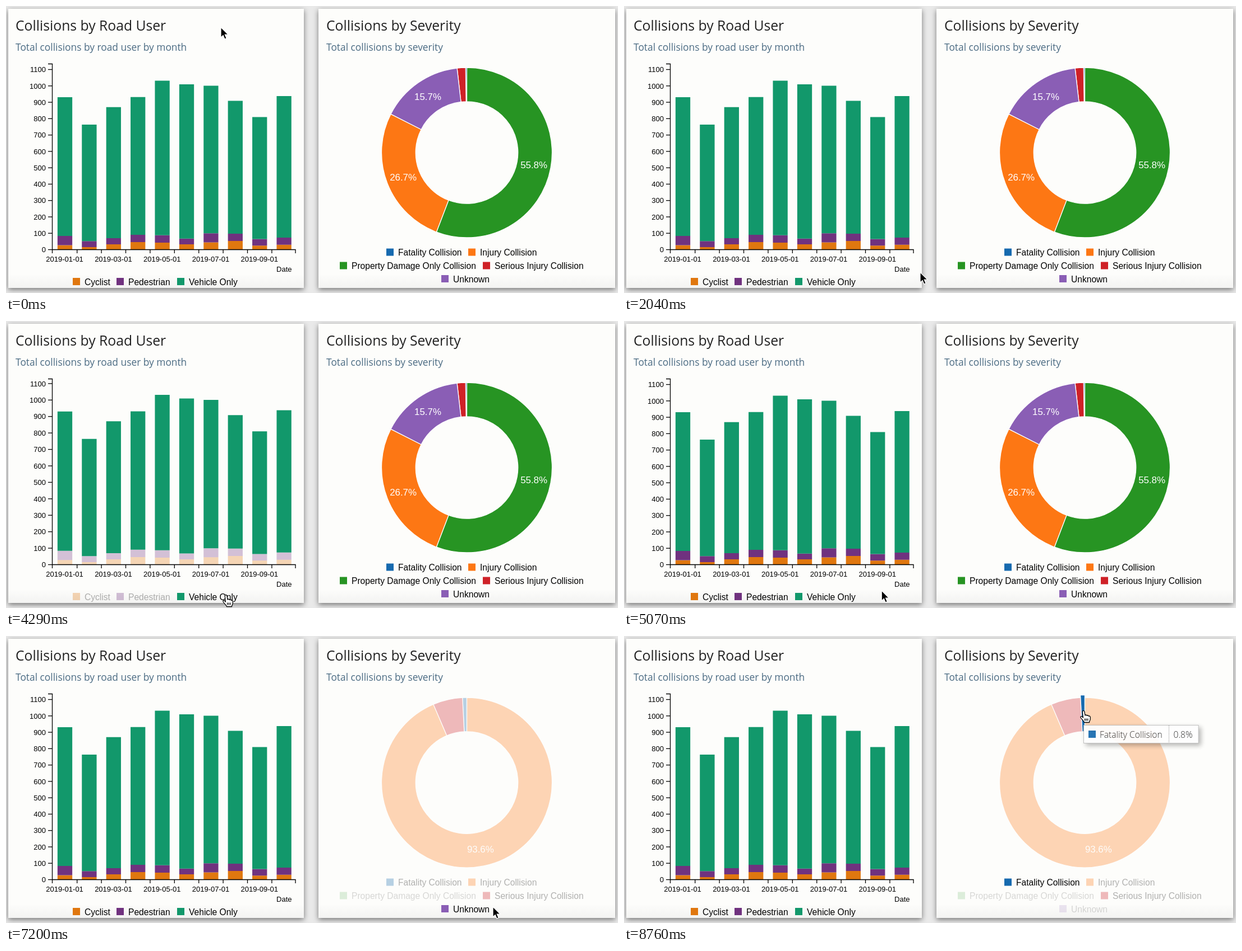
Animation, 1091 px wide and 513 px high, one loop 8.79 s. Source, as an HTML page:

```html
<!DOCTYPE html>
<html lang="en">
<head>
<meta charset="utf-8">
<title>Collisions dashboard</title>
<style>
  html, body { margin: 0; width: 100%; height: 100%; overflow: hidden; background: #e9e9e9; }
  svg { display: block; font-family: "Liberation Sans", Arial, sans-serif; }
  .card { fill: url(#paper); filter: drop-shadow(0 3px 5px rgba(0,0,0,.5)); }
  .title { font: 24.7px "Open Sans", sans-serif; fill: #222; }
  .sub { font: 17.35px "Open Sans", sans-serif; fill: #4b6b83; }
  .axis { fill: none; stroke: #000; stroke-width: 1.3; }
  .tick { font-size: 13px; }
  .key { font-size: 15.6px; }
  .share { font-size: 16.9px; fill: #fff; text-anchor: middle; }
  .tip { font: 300 15.6px "Open Sans", sans-serif; fill: #222; }
</style>
</head>
<body>
<svg id="stage" width="1091" height="513" viewBox="0 0 1091 513">
  <defs>
    <linearGradient id="paper" x1="0" y1="0" x2="0" y2="1">
      <stop offset=".95" stop-color="#fdfdfb"/>
      <stop offset="1" stop-color="#f3f3f2"/>
    </linearGradient>
    <clipPath id="plot"><rect x="60" y="103" width="460" height="333"/></clipPath>
  </defs>
  <rect width="1091" height="513" fill="#e9e9e9"/>
  <rect class="card" x="4" y="5" width="527" height="499"/>
  <rect class="card" x="557" y="5" width="529" height="499"/>
  <text class="title" x="17" y="44">Collisions by Road User</text>
  <text class="sub" x="17" y="79.5">Total collisions by road user by month</text>
  <text class="title" x="571" y="44">Collisions by Severity</text>
  <text class="sub" x="571" y="79.5">Total collisions by severity</text>
  <text class="tick" x="509.5" y="474.5" text-anchor="end">Date</text>
</svg>
<script>
const LOOP = 8790, BASE = 435, TOP = 103.5, RIGHT = 516;
const CX = 821.5, CY = 262, OUTER = 152, INNER = 91.2;

// Clicks that toggle a legend entry
const HIDE_VEHICLE = 2500, SHOW_VEHICLE = 3959, HIDE_DAMAGE = 6350, HIDE_UNKNOWN = 6800;

const cyclist = [26, 14, 31, 44, 41, 31, 43, 51, 23, 28];
const onFoot = [82, 50, 68, 89, 86, 66, 98, 96, 63, 72];
const total = [929, 762, 869, 930, 1030, 1008, 999, 907, 808, 936];
const levels = [cyclist.map(() => 0), cyclist, onFoot, total];

const users = [
  { name: "Cyclist", color: "#e0770f", x: 119, y: 486 },
  { name: "Pedestrian", color: "#70327f", x: 197, y: 486 },
  { name: "Vehicle Only", color: "#12986b", x: 305, y: 486 }
];
const kinds = [
  { name: "Fatality Collision", color: "#166aaf", x: 678, y: 433.5, size: .23 },
  { name: "Injury Collision", color: "#fd7714", x: 824, y: 433.5, size: 26.7 },
  { name: "Property Damage Only Collision", color: "#279423", x: 595, y: 457.5, size: 55.8 },
  { name: "Serious Injury Collision", color: "#cf2127", x: 850, y: 457.5, size: 1.6 },
  { name: "Unknown", color: "#8a5eb5", x: 776, y: 481, size: 15.7 }
];
const clockwise = [2, 1, 4, 3, 0];

// Focused entry over time, -1 for none
const userFocus = [[0, -1], [2300, 2], [2760, -1], [3720, 2], [4720, -1]];
const kindFocus = [[0, -1], [5750, 2], [6610, 4], [7240, -1], [7660, 1], [7825, -1], [8400, 0]];
const handTimes = [[2300, 2760], [3720, 4720], [5750, 7130], [7660, 7825], [8400, LOOP]];
const route = [
  [0, 383, 38], [900, 383, 38], [2040, 528, 476], [2350, 372, 493], [2600, 372, 493],
  [2910, 515, 486], [3300, 515, 486], [3800, 392, 490], [4600, 392, 490],
  [5900, 617, 463], [6400, 617, 463], [6680, 825, 488], [6850, 825, 488],
  [7200, 868, 484], [7300, 868, 484], [8550, 819, 134], [LOOP, 819, 134]
];

const stage = document.getElementById("stage");
const lerp = (a, b, u) => a + (b - a) * u;
const clamp = u => Math.max(0, Math.min(1, u));
const smooth = u => u * u * (3 - 2 * u);
const cubic = u => u < .5 ? 4 * u ** 3 : 1 - 4 * (1 - u) ** 3;
const redraw = (t, start) => cubic(clamp((t - start) / 350));

function set(el, attrs) {
  for (const k in attrs) el.setAttribute(k, attrs[k]);
  return el;
}
function add(tag, attrs, parent = stage, text) {
  const el = set(document.createElementNS("http://www.w3.org/2000/svg", tag), attrs);
  if (text !== undefined) el.textContent = text;
  return parent.appendChild(el);
}

// Bar chart
const plot = add("g", { "clip-path": "url(#plot)" });
const layers = users.map(u => add("path", { fill: u.color }, plot));
const frame = add("path", { class: "axis" });
function makeTicks(step, count) {
  return Array.from({ length: count }, (_, i) => {
    const g = add("g", {});
    add("path", { class: "axis", d: "M-7.5 0H0" }, g);
    add("text", { class: "tick", x: -11.5, y: 4.7, "text-anchor": "end" }, g, i * step);
    return { g, value: i * step };
  });
}
const coarse = makeTicks(100, 12), fine = makeTicks(10, 11);
const months = [1, 3, 5, 7, 9].map(m => ({
  slot: m - 1,
  el: add("text", { class: "tick", y: 456.5, "text-anchor": "middle" }, stage, `2019-0${m}-01`)
}));

// Donut chart
const slices = kinds.map(k => {
  const g = add("g", {});
  return {
    g,
    arc: add("path", { fill: k.color, stroke: "#fff", "stroke-width": 1.3 }, g),
    label: add("text", { class: "share" }, g)
  };
});

const makeLegend = list => list.map(k => {
  const g = add("g", {});
  add("rect", { x: k.x, y: k.y, width: 13, height: 13, fill: k.color }, g);
  add("text", { class: "key", x: k.x + 21, y: k.y + 12.7 }, g, k.name);
  return g;
});
const userKeys = makeLegend(users), kindKeys = makeLegend(kinds);

// Tooltip
const tip = add("g", { opacity: .92 });
const tipBox = add("rect", {
  x: .5, y: .5, height: 32, fill: "#fff", stroke: "#bbb",
  style: "filter:drop-shadow(4px 4px 4px rgba(0,0,0,.3))"
}, tip);
const tipMark = add("rect", { x: 9, y: 10, width: 13, height: 13 }, tip);
const tipName = add("text", { class: "tip", x: 29, y: 22.5 }, tip);
const tipLine = add("path", { stroke: "#888", "stroke-dasharray": "1.3 1.3" }, tip);
const tipShare = add("text", { class: "tip", y: 22.5 }, tip);

// Pointers, both with the hot spot at 0,0
const arrow = add("path", {
  d: "M0 0V18.2L4.1 14.4L6.9 21L10.1 19.7L7.3 13.2H13Z",
  fill: "#000", stroke: "#fff", "stroke-width": 1.2
});
const hand = add("g", { stroke: "#000", "stroke-width": 1.3, "stroke-linejoin": "round" });
add("path", {
  d: "M-1.8 1.2C-1.8-.9 1.8-.9 1.9 1.2L3 8C3.5 6.5 6 6.8 6.3 8.5C7 7.2 9.3 7.8 9.5 9.4" +
     "C10.5 8.6 12.3 9.2 12.3 11V14C12.3 17 10.5 17.5 10.5 20.5H1.5" +
     "C1 18-2.5 15.5-4.8 12C-6 9.8-3.4 8.8-2 10.4L-.6 12Z",
  fill: "#fff"
}, hand);
add("path", { d: "M2.6 13.5V17.5M5.2 13.5V17.5M7.8 13.5V17.5", fill: "none" }, hand);

// Blend a value that depends on the focus across each change
function onFocus(list, t, value) {
  const i = list.findLastIndex(e => e[0] <= t);
  const now = value(list[i][1]);
  return i ? lerp(value(list[i - 1][1]), now, clamp((t - list[i][0]) / 100)) : now;
}
const dim = (list, t, k) => onFocus(list, t, f => f < 0 || f === k ? 1 : .3);
const keyAlpha = (list, t, k, hidden) =>
  onFocus(list, t, f => f === k ? 1 : hidden ? .15 : f < 0 ? 1 : .3);

function drawBars(t) {
  const zoom = redraw(t, HIDE_VEHICLE) - redraw(t, SHOW_VEHICLE);
  const left = lerp(82.5, 69.5, zoom), step = lerp(43.4, 44.7, zoom);
  const first = lerp(105, 93, zoom), width = lerp(26.3, 28.6, zoom);
  const unit = lerp(.2927, 3.0725, zoom), y = v => BASE - v * unit;

  layers.forEach((el, k) => {
    const d = levels[k + 1].map((v, i) => {
      const x = first + i * step - width / 2;
      return `M${x} ${y(levels[k][i])}V${y(v)}h${width}V${y(levels[k][i])}Z`;
    }).join("");
    set(el, { d, opacity: dim(userFocus, t, k) * (k === 2 ? 1 - zoom : 1) });
  });

  let d = `M${left - 7.5} ${TOP}H${left}V${BASE + .5}M${left} 442V${BASE + .5}H${RIGHT}V442`;
  for (let i = 1; i < 10; i++) d += `M${left + .8 + i * step} ${BASE}V442`;
  set(frame, { d });

  for (const [ticks, alpha] of [[coarse, 1 - zoom], [fine, zoom]]) {
    for (const { g, value } of ticks) {
      const ty = y(value) + .5;
      set(g, { transform: `translate(${left} ${ty})`, opacity: ty < TOP ? 0 : alpha });
    }
  }
  months.forEach(m => set(m.el, { x: first - .4 + m.slot * step }));

  const hidden = t >= HIDE_VEHICLE && t < SHOW_VEHICLE;
  userKeys.forEach((g, k) => set(g, { opacity: keyAlpha(userFocus, t, k, hidden && k === 2) }));
}

function shares(without) {
  const sizes = kinds.map((k, i) => without.includes(i) ? 0 : k.size);
  const sum = sizes.reduce((a, b) => a + b);
  return sizes.map(s => s / sum);
}
const steps = [shares([]), shares([2]), shares([2, 4])];

function arcPath(a, b, r) {
  const at = (angle, q) => `${CX + Math.sin(angle) * q} ${CY - Math.cos(angle) * q}`;
  const big = b - a > Math.PI ? 1 : 0;
  return `M${at(a, r)}A${r} ${r} 0 ${big} 1 ${at(b, r)}` +
         `L${at(b, INNER)}A${INNER} ${INNER} 0 ${big} 0 ${at(a, INNER)}Z`;
}
const percent = r => (r * 100).toFixed(1) + "%";

function drawDonut(t) {
  const first = redraw(t, HIDE_DAMAGE), second = redraw(t, HIDE_UNKNOWN);
  const gone = { 2: first, 4: second };
  const ratio = kinds.map((_, i) =>
    lerp(steps[0][i], steps[1][i], first) + (steps[2][i] - steps[1][i]) * second);

  let angle = 0;
  for (const k of clockwise) {
    const { g, arc, label } = slices[k];
    const end = angle + ratio[k] * 2 * Math.PI, mid = (angle + end) / 2;
    const grow = onFocus(kindFocus, t, f => f === k ? 1.03 : 1);
    const shown = ratio[k] > 1e-5;
    set(g, { opacity: shown ? dim(kindFocus, t, k) * (1 - (gone[k] || 0)) : 0 });
    if (shown) set(arc, { d: arcPath(angle, end, OUTER * grow) });
    const q = (OUTER + INNER) / 2;
    set(label, {
      x: CX + Math.sin(mid) * q, y: CY - Math.cos(mid) * q + 6,
      opacity: ratio[k] > .1 ? 1 : 0
    });
    label.textContent = percent(ratio[k]);
    angle = end;
  }
  kindKeys.forEach((g, k) => {
    const hidden = k === 2 && t >= HIDE_DAMAGE || k === 4 && t >= HIDE_UNKNOWN;
    set(g, { opacity: keyAlpha(kindFocus, t, k, hidden) });
  });
  return ratio;
}

function pointerAt(t) {
  const i = Math.max(1, route.findIndex(p => p[0] > t));
  const [t0, x0, y0] = route[i - 1], [t1, x1, y1] = route[i];
  const u = smooth((t - t0) / (t1 - t0));
  return [lerp(x0, x1, u), lerp(y0, y1, u)];
}

function drawPointer(t, ratio) {
  const [x, y] = pointerAt(t);
  const pointing = handTimes.some(([a, b]) => t >= a && t < b);
  set(arrow, { transform: `translate(${x} ${y})`, display: pointing ? "none" : "inline" });
  set(hand, { transform: `translate(${x} ${y})`, display: pointing ? "inline" : "none" });

  const k = kindFocus.findLast(e => e[0] <= t)[1];
  const open = t > 7500 && k >= 0;
  set(tip, { display: open ? "inline" : "none", transform: `translate(${x} ${y + 25})` });
  if (!open) return;
  tipName.textContent = kinds[k].name;
  tipShare.textContent = percent(ratio[k]);
  const split = Math.round(29 + tipName.getComputedTextLength() + 11) + .5;
  set(tipMark, { fill: kinds[k].color });
  set(tipLine, { d: `M${split} 1V32` });
  set(tipShare, { x: split + 8 });
  set(tipBox, { width: split + 18 + tipShare.getComputedTextLength() });
}

function draw(t) {
  drawBars(t);
  drawPointer(t, drawDonut(t));
}

const start = performance.now();
function tick() {
  draw((performance.now() - start) % LOOP);
  requestAnimationFrame(tick);
}
tick();
</script>
</body>
</html>
```
